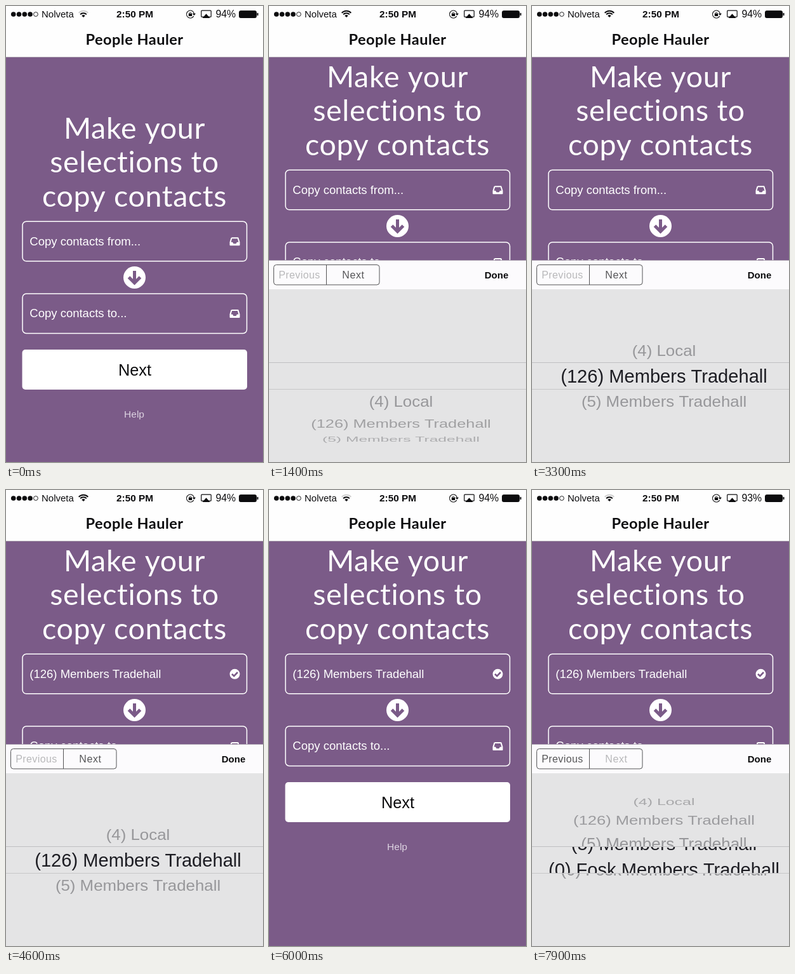
Write an HTML page with a canvas that moves like this. It is 405 px wide and 718 px high and loops after 8 s.

```html
<!DOCTYPE html>
<html lang="en">
<head>
<meta charset="utf-8">
<title>Copy contacts</title>
<style>
  html, body { margin: 0; width: 100%; height: 100%; overflow: hidden; }
  canvas { display: block; }
</style>
</head>
<body>
<canvas id="stage" width="405" height="718"></canvas>
<script>
const ctx = document.getElementById('stage').getContext('2d');
const LOOP = 8000, STEP = 100;
const PURPLE = '#7b5b88', INK = '#0c0c0e', PICKER = '#e4e4e5', EDGE = '#aca2b1';
const SANS = '"Liberation Sans", Arial, sans-serif';
const ROUND = 'Lato, "Open Sans", sans-serif';
const ACCOUNT = '(126) Members Tradehall';
const ROWS = ['', '(4) Local', ACCOUNT, '(5) Members Tradehall', '(0) Fosk Members Tradehall'];

const progress = (t, start, length) => Math.min(1, Math.max(0, (t - start) / length));
const easeOut = (p, power = 3) => 1 - (1 - p) ** power;

function text(str, x, y, font, color, align = 'left', spacing = 0) {
  ctx.font = font;
  ctx.fillStyle = color;
  ctx.textAlign = align;
  ctx.letterSpacing = spacing + 'px';
  ctx.fillText(str, x, y);
}

function rect(x, y, w, h, color) {
  ctx.fillStyle = color;
  ctx.fillRect(x, y, w, h);
}

function roundRect(x, y, w, h, r, fill, stroke, lineWidth = 1) {
  ctx.beginPath();
  ctx.roundRect(x, y, w, h, r);
  paint(fill, stroke, lineWidth);
}

function circle(x, y, r, fill, stroke, lineWidth = 1) {
  ctx.beginPath();
  ctx.arc(x, y, r, 0, 7);
  paint(fill, stroke, lineWidth);
}

function paint(fill, stroke, lineWidth) {
  if (fill) { ctx.fillStyle = fill; ctx.fill(); }
  if (stroke) { ctx.strokeStyle = stroke; ctx.lineWidth = lineWidth; ctx.stroke(); }
}

function path(points, fill, stroke, lineWidth) {
  ctx.beginPath();
  points.forEach(([x, y]) => ctx.lineTo(x, y));
  paint(fill, stroke, lineWidth);
}

function inboxIcon(x, y) {
  ctx.lineJoin = 'round';
  path([[x - 5, y - 5.5], [x + 5, y - 5.5], [x + 7, y + 1], [x + 7, y + 5.5],
    [x - 7, y + 5.5], [x - 7, y + 1], [x - 5, y - 5.5]], null, '#fff', 2);
  path([[x - 7, y + 1], [x - 3.5, y + 1], [x - 2, y + 3.5], [x + 2, y + 3.5],
    [x + 3.5, y + 1], [x + 7, y + 1], [x + 7, y + 6], [x - 7, y + 6]], '#fff');
  ctx.lineJoin = 'miter';
}

function checkIcon(x, y) {
  circle(x, y, 8, '#fff');
  path([[x - 4.5, y], [x - 1.2, y + 3.2], [x + 4.5, y - 2.8]], null, PURPLE, 2.6);
}

function field(y, label, done) {
  roundRect(26, y, 353.5, 62.5, 6, null, '#fff', 1.5);
  text(label, 37.3, y + 37.3, '18.5px ' + SANS, '#fff');
  (done ? checkIcon : inboxIcon)(360.5, y + 31.5);
}

function page(scroll, chosen) {
  rect(0, 0, 405, 718, PURPLE);
  ctx.save();
  ctx.translate(0, -scroll);
  ['Make your', 'selections to', 'copy contacts'].forEach((line, i) =>
    text(line, 202.5, 208.5 + 53.7 * i, '46.5px ' + ROUND, '#fff', 'center', 0.7));
  field(339.3, chosen ? ACCOUNT : 'Copy contacts from...', chosen);
  circle(202.5, 427.5, 17.5, '#fff');
  path([[202.5, 417], [202.5, 435]], null, PURPLE, 5);
  path([[193.5, 427], [202.5, 436], [211.5, 427]], null, PURPLE, 5);
  field(452.9, 'Copy contacts to...', false);
  roundRect(25.5, 541, 354.5, 63, 5, '#fff');
  text('Next', 203, 582, '25.3px ' + SANS, INK, 'center');
  text('Help', 202, 648, '15.5px ' + SANS, '#ddd3e1', 'center');
  ctx.restore();
}

function wifi(strong) {
  const x = 122, y = 18, spread = 0.8;
  const arc = (r, color) => {
    ctx.beginPath();
    ctx.arc(x, y, r, -Math.PI / 2 - spread, -Math.PI / 2 + spread);
    paint(null, color, 2);
  };
  ctx.beginPath();
  ctx.moveTo(x, y);
  ctx.arc(x, y, 3.8, -Math.PI / 2 - spread, -Math.PI / 2 + spread);
  paint(INK);
  arc(6.8, INK);
  arc(10.2, strong ? INK : '#cfcfcf');
}

function header(strong, charge) {
  rect(0, 0, 405, 80, '#fefefe');
  rect(0, 80, 405, 1, EDGE);
  for (let i = 0; i < 5; i++)
    circle(11.7 + 8.8 * i, 13, i < 4 ? 3.8 : 3.4, i < 4 && INK, i === 4 && INK, 0.9);
  text('Nolveta', 56, 18, '15px ' + SANS, INK);
  wifi(strong);
  text('2:50 PM', 203, 18, 'bold 15.3px ' + SANS, INK, 'center');

  // rotation lock
  ctx.beginPath();
  ctx.arc(290.5, 13, 6, 0.5, 6.1);
  paint(null, INK, 1.1);
  path([[293.8, 11.8], [299, 11.8], [296.4, 15]], INK);
  rect(287.8, 12, 5.4, 4, INK);
  ctx.beginPath();
  ctx.arc(290.5, 12, 1.7, Math.PI, 0);
  paint(null, INK, 1);

  // screen sharing
  roundRect(307.7, 7.2, 15.5, 10, 1, null, INK, 1.2);
  path([[309.5, 19], [315.5, 12.2], [321.5, 19]], INK);

  text(charge + '%', 330.5, 18, '15.8px ' + SANS, INK);
  roundRect(367.5, 7.7, 27, 10.8, 2, INK, INK, 1);
  rect(395.5, 11, 2, 4, INK);
  text('People Hauler', 202.5, 60.5, 'bold 23.5px ' + ROUND, INK, 'center', 0.5);
}

// Rows sit on a cylinder seen from the front.
function wheel(rows, position, size, color, fade) {
  rows.forEach((row, i) => {
    const angle = (i - position) * 0.372, depth = Math.cos(angle);
    if (Math.abs(angle) > 1.55) return;
    const scale = 1 / (1 + 0.1 * (1 - depth));
    ctx.save();
    ctx.globalAlpha = fade ? 0.45 + 0.55 * depth : 1;
    ctx.translate(208, 183 + 110 * Math.sin(angle));
    ctx.scale(scale, scale * depth);
    text(row, 0, size * 0.35, size + 'px ' + SANS, color, 'center');
    ctx.restore();
  });
}

function keyboard(top, position, second) {
  const tone = on => on ? '#565658' : '#b8b8ba';
  ctx.save();
  ctx.translate(0, top);
  rect(0, 0, 405, 1, EDGE);
  rect(0, 1, 405, 45, '#fcfbfd');
  rect(0, 46, 405, 272, PICKER);
  roundRect(7.5, 7.5, 166.5, 31.5, 4, null, '#555557');
  rect(90, 7.5, 1, 31.5, '#555557');
  text('Previous', 48, 29, '16px ' + SANS, tone(second), 'center', 0.4);
  text('Next', 133, 29, '16px ' + SANS, tone(!second), 'center', 0.6);
  text('Done', 358.5, 29, 'bold 15px ' + SANS, INK, 'center');

  const rows = second ? ROWS : ROWS.slice(0, 4);
  wheel(rows, position, 26, '#949497', true);
  ctx.beginPath();
  ctx.rect(0, 161, 405, 43);
  ctx.clip();
  rect(0, 161, 405, 43, PICKER);
  wheel(rows, position, 29.1, '#1d1d23', false);
  rect(0, 161, 405, 1, '#bfbfc1');
  rect(0, 203, 405, 1, '#c6c6c8');
  ctx.restore();
}

function draw(now) {
  const t = Math.floor(now % LOOP / STEP) * STEP;
  const second = t > 5500;
  const slide = start => easeOut(progress(t, start, 520));
  const raised = slide(550) - slide(4680) + slide(6250);
  const position = second
    ? 4 * easeOut(progress(t, 7150, 1070), 2)
    : 2 * easeOut(progress(t, 1430, 740));

  page(81 * slide(550), t >= 3500);
  if (raised > 0) keyboard(718 - 318 * raised, position, second);
  header(t >= 1000 && t < 6000, t < 7000 ? 94 : 93);
  requestAnimationFrame(draw);
}
requestAnimationFrame(draw);
</script>
</body>
</html>
```
